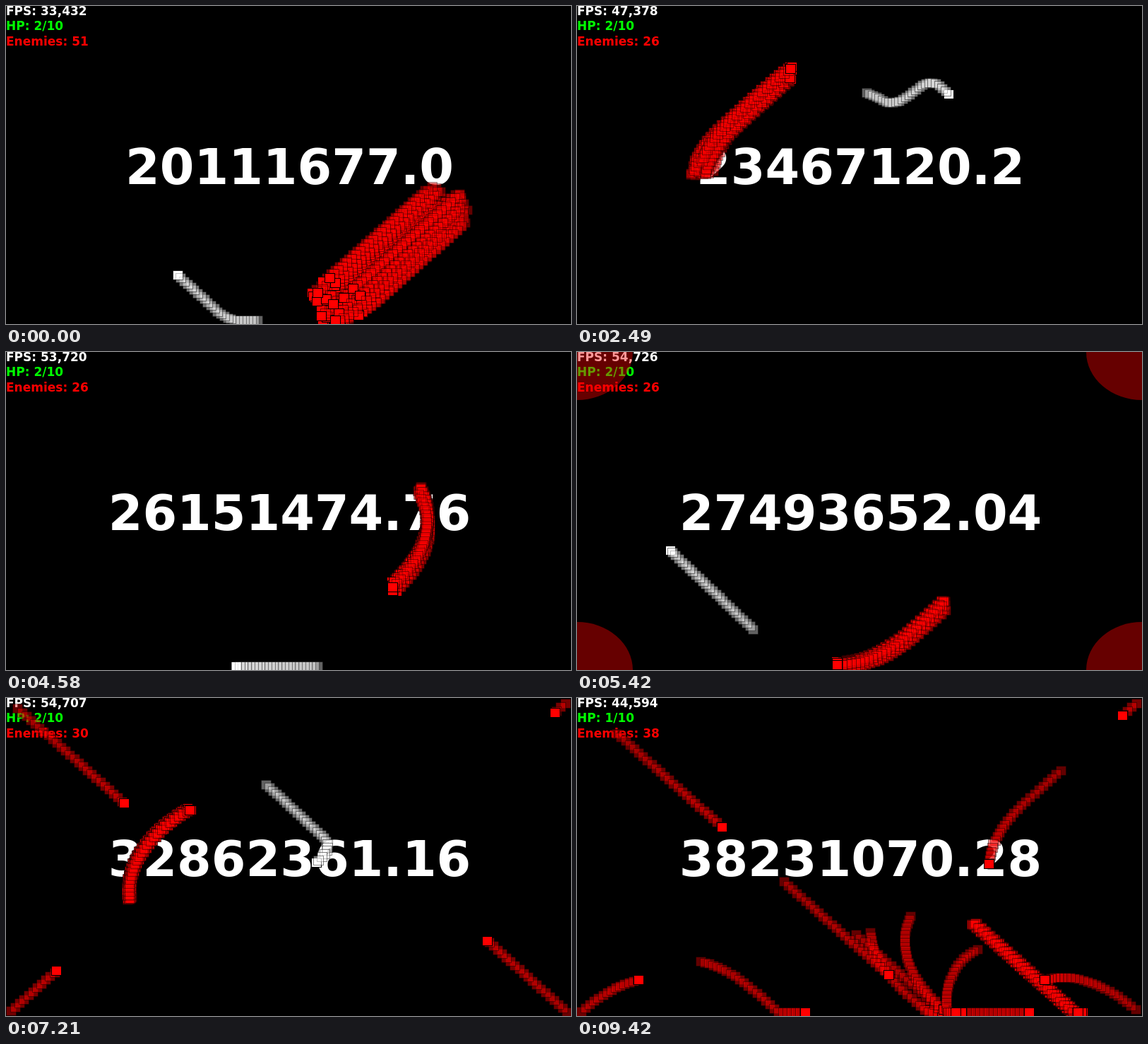
An HTML page with a canvas for the animation above (9450 ms loop, 800 px wide and 450 px high).

```html
<!DOCTYPE html>
<html lang="en">
<head>
<meta charset="utf-8">
<title>Chase</title>
<style>
  html, body { margin: 0; width: 100%; height: 100%; overflow: hidden; background: #000; }
  canvas { display: block; width: 800px; height: 450px; }
</style>
</head>
<body>
<canvas id="stage" width="800" height="450"></canvas>
<script>
const ctx = document.getElementById('stage').getContext('2d');
const W = 800, H = 450, LOOP = 9450, START = -900, STEP = 6;
const PIECES = 25, FIRST_SPAWN = 27, SPAWNS = 12;
const FONT = '"DejaVu Sans", Verdana, sans-serif';
const clamp = (v, lo, hi) => Math.min(hi, Math.max(lo, v));

// Value at t on straight segments through [t, value] points.
function line(points, t) {
  let k = 0;
  while (k < points.length - 2 && points[k + 1][0] <= t) k++;
  const [t0, a] = points[k], [t1, b] = points[k + 1];
  return a + (b - a) * (t - t0) / (t1 - t0);
}

// The player runs at a steady pace on each axis; only the turns are given.
const TURN_X = [[-560, 370], [615, 103], [3105, 664], [5550, 102], [7105, 463], [7650, 340], [9450, 747]];
const TURN_Y = [[-900, 445], [-310, 445], [1390, 94], [1680, 121], [1970, 121], [2150, 142],
  [2385, 102], [3990, 445], [4670, 445], [6420, 63], [8200, 445], [9450, 445]];

function player(t) {
  const soft = points => {
    let sum = 0;
    for (let d = -60; d <= 60; d += 20) sum += line(points, t + d);
    return sum / 7;
  };
  return [soft(TURN_X), soft(TURN_Y)];
}

// Pursuit: each axis accelerates towards the player up to a top speed.
function chaser(born, x, y, vx, vy, pace = 1) {
  const top = [0.214 * pace, 0.19 * pace], push = [0.00044, 0.00037];
  const pos = [x, y], v = [vx * top[0], vy * top[1]], path = [];
  for (let t = born; t <= LOOP + STEP; t += STEP) {
    path.push([...pos]);
    const goal = player(t);
    for (const i of [0, 1]) {
      v[i] = clamp(v[i] + Math.sign(goal[i] - pos[i]) * push[i] * STEP, -top[i], top[i]);
      pos[i] = clamp(pos[i] + v[i] * STEP, 5, (i ? H : W) - 5);
    }
  }
  const at = t => {
    const s = clamp((t - born) / STEP, 0, path.length - 1.001), k = Math.floor(s), u = s - k;
    return path[k].map((p, i) => p + (path[k + 1][i] - p) * u);
  };
  return { born, at };
}

let seed = 7;
const rand = () => (seed = seed * 16807 % 2147483647) / 2147483647;
const swarm = Array.from({ length: 51 }, () => {
  const a = rand() * 2 * Math.PI, r = 38 * Math.sqrt(rand());
  return chaser(START, 661 + r * Math.cos(a), 250 + r * Math.sin(a), -1, 1, 0.98 + rand() * 0.04);
});

// Game ticks drive the score and the corner spawns.
const TICKS = [[0, 0.3], [5420, 22.4], [7210, 30.4], [9420, 38.4]];
const FPS = [[0, 33426], [1060, 39352], [2490, 47374], [3700, 52663], [5420, 54726], [7210, 54712], [9420, 44599]];
const tickTime = n => line(TICKS.map(([t, v]) => [v, t]), n);
const CORNERS = [[0, 0], [1, 1], [0, 1], [1, 0]];
const hunters = Array.from({ length: SPAWNS }, (_, i) => {
  const [cx, cy] = CORNERS[i % 4];
  return chaser(tickTime(FIRST_SPAWN + i), cx * W, cy * H, 1 - 2 * cx, 1 - 2 * cy);
});

function box([x, y], color, alpha) {
  x = Math.round(x) - 6.5;
  y = Math.round(y) - 6.5;
  ctx.globalAlpha = alpha;
  ctx.fillStyle = color;
  ctx.fillRect(x, y, 14, 13);
  ctx.strokeRect(x, y, 14, 13);
  ctx.globalAlpha = 1;
}

// Trail pieces stay where they were dropped.
function trail(body, t, gap, color, alpha) {
  const drop = Math.floor(t / gap) * gap;
  for (let k = PIECES - 1; k >= 0; k--) {
    const past = drop - k * gap;
    if (past >= body.born) box(body.at(past), color, alpha * (1 - 0.2 * k / PIECES));
  }
}

function text(str, x, y, size, color, align = 'left') {
  ctx.font = `bold ${size}px ${FONT}`;
  ctx.textAlign = align;
  ctx.fillStyle = color;
  ctx.fillText(str, x, y);
}

function scoreText(n) {
  const steps = n + Math.max(0, n - 22);
  return ((2011167700 + steps * 33554432) / 100).toFixed(2).replace(/0$/, '');
}

function drawWarnings() {
  ctx.fillStyle = 'rgba(255,0,0,.4)';
  for (const [cx, cy] of CORNERS) {
    ctx.beginPath();
    ctx.ellipse(cx * W, cy * H, 79, 68, 0, 0, 2 * Math.PI);
    ctx.fill();
  }
}

function draw(t) {
  const tick = Math.floor(line(TICKS, t));
  const enemies = swarm.slice(0, t < 2200 ? 51 : 26).concat(hunters.filter(h => h.born <= t));
  const hit = t >= 9100;
  ctx.fillStyle = '#000';
  ctx.fillRect(0, 0, W, H);
  text('FPS: ' + Math.round(line(FPS, t)).toLocaleString('en-US'), 0, 12.5, 17, '#fff');
  text(`HP: ${hit ? 1 : 2}/10`, 0, 34, 17, '#0f0');
  text('Enemies: ' + enemies.length, 0, 55.5, 17, '#f00');
  text(scoreText(tick), 401.5, 251.5, 70, '#fff', 'center');

  ctx.strokeStyle = '#000';
  ctx.lineWidth = 1;
  if (!hit) {
    box(player(t), '#fff', 1);
    trail({ born: START, at: player }, t, 20.8, '#fff', 0.47);
  }
  for (const e of enemies) {
    trail(e, t, 28.8, '#f00', 0.48);
    box(e.at(t), '#f00', 1);
  }
  if (tick >= 22 && tick < FIRST_SPAWN) drawWarnings();
}

const start = performance.now();
function loop() {
  draw((performance.now() - start) % LOOP);
  requestAnimationFrame(loop);
}
loop();
</script>
</body>
</html>
```
